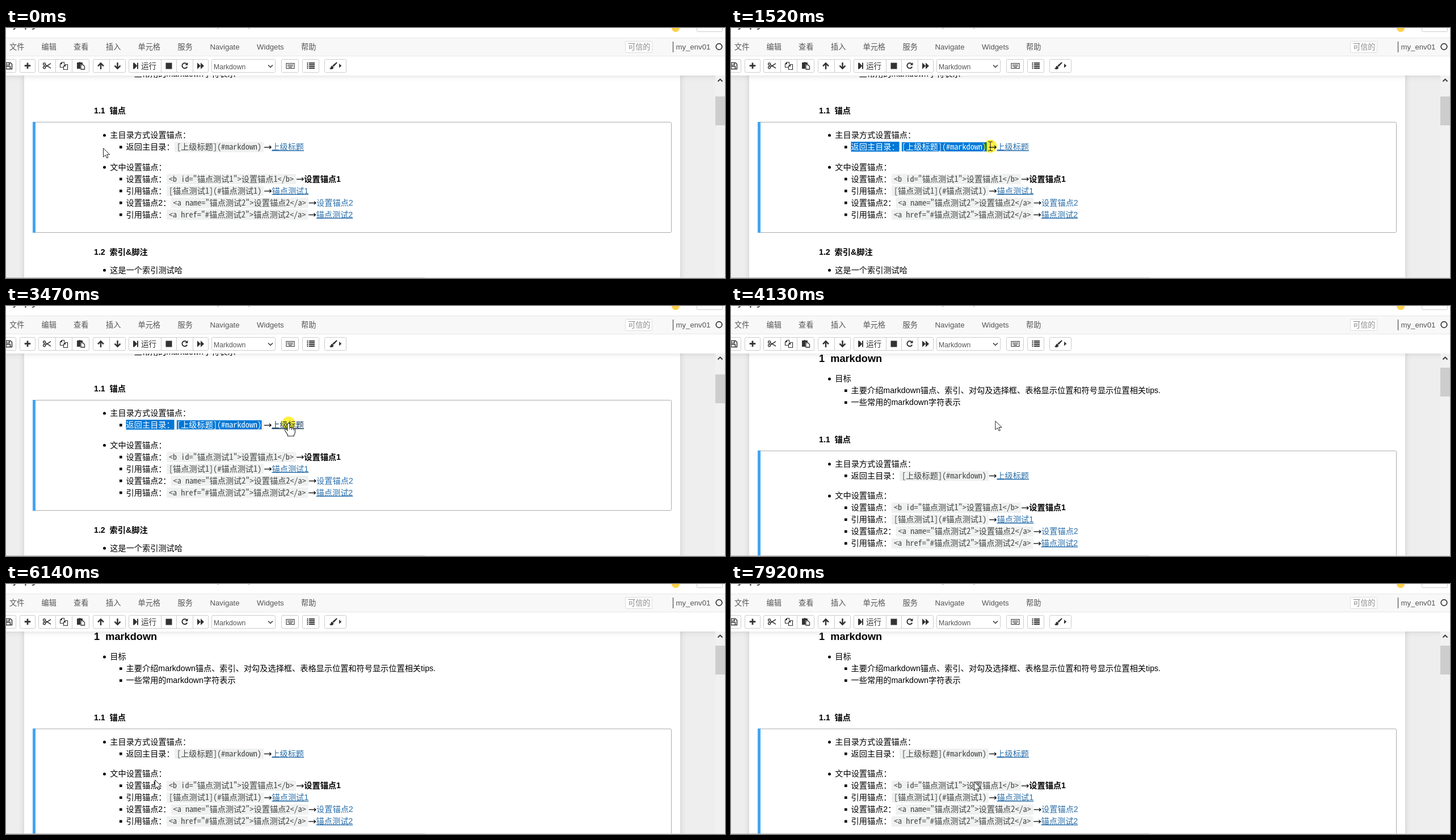
Animation of 1267 by 442 pixels, one loop 7.99 s. Source, as an HTML page:

```html
<!DOCTYPE html>
<html lang="zh-CN">
<head>
<meta charset="utf-8">
<title>Notebook anchors</title>
<style>
html, body { margin: 0; width: 100%; height: 100%; overflow: hidden; background: #eee; }
svg { display: block; width: 1267px; height: 442px; }
text { font: 14.2px "Liberation Sans", "Noto Sans CJK SC", "Noto Sans CJK", sans-serif; white-space: pre; }
.h1 { font-size: 18.2px; font-weight: bold; }
.b { font-weight: bold; }
.menu { font-size: 13.2px; fill: #555; }
.pale { fill: #888; }
.code { font-family: "Noto Sans Mono CJK SC", "Noto Sans CJK SC", "Liberation Mono", monospace; font-weight: 300; fill: #444; }
.code .half { font-family: "Noto Sans Mono CJK SC", "Liberation Mono", monospace; }
.link { fill: #296eaa; }
.u { text-decoration: underline; }
.hover { fill: #173a5c; }
.sel text { fill: #fff; }
.btn { fill: #fff; stroke: #ccc; }
.ink { fill: #333; }
.line { fill: none; stroke: #333; }
#ring { fill: #fff040; mix-blend-mode: multiply; }
</style>
</head>
<body>
<svg id="stage" viewBox="0 0 1267 442" xmlns="http://www.w3.org/2000/svg"></svg>
<script>
const LOOP = 7990, SCROLL_AT = 3600;
const PAGE_Y = -0.4, SCROLLED_Y = 89.2;
const EM = 14.2, HALF = EM / 2;
const stage = document.getElementById('stage');

// Latin letters in code take half the width of a Chinese one.
const pen = document.createElement('canvas').getContext('2d');
pen.font = '100px "Noto Sans Mono CJK SC", "Liberation Mono", monospace';
const halfSize = HALF * 100 / pen.measureText('m').width;

const esc = s => s.replace(/&/g, '&amp;').replace(/</g, '&lt;').replace(/>/g, '&gt;');
const text = (x, y, s, cls = '') => `<text x="${x}" y="${y}" class="${cls}">${esc(s)}</text>`;
const rect = (x, y, w, h, fill) => `<rect x="${x}" y="${y}" width="${w}" height="${h}" fill="${fill}"/>`;
const box = (x, y, w, h, r = 2) => `<rect class="btn" x="${x}" y="${y}" width="${w}" height="${h}" rx="${r}"/>`;
const ink = d => `<path class="ink" d="${d}"/>`;
const line = (d, w = 1.3) => `<path class="line" stroke-width="${w}" d="${d}"/>`;
const dot = (x, y, r, fill) => `<circle cx="${x}" cy="${y}" r="${r}" fill="${fill}"/>`;

const isWide = c => c.charCodeAt(0) > 255;
const columns = s => [...s].reduce((n, c) => n + (isWide(c) ? 2 : 1), 0);

function codeText(x, y, s) {
  const runs = s.match(/[\x00-\xff]+|[^\x00-\xff]+/g).map(r => isWide(r)
    ? r : `<tspan class="half" font-size="${halfSize}">${esc(r)}</tspan>`);
  return `<text x="${x}" y="${y}" class="code">${runs.join('')}</text>`;
}

function item(y, s) {
  return dot(173.5, y - 4.3, 2.5, '#000') + text(183.3, y, s);
}

function subItem(y, s) {
  return rect(200, y - 6.8, 4.6, 4.6, '#000') + text(211.6, y, s);
}

function arrow(x, y) {
  return `<path d="M${x + .8} ${y - 4.3}h12M${x + 10} ${y - 7.1}l3 2.8l-3 2.8" fill="none" stroke="#000" stroke-width="1.2"/>`;
}

// label, code sample, arrow, result
function sample(y, label, boxX, code, result, cls, id = '') {
  const w = columns(code) * HALF + 8, end = boxX + w;
  return subItem(y, label) +
    `<rect x="${boxX}" y="${y - 13.5}" width="${w}" height="18" rx="1" fill="#eff0f0"/>` +
    codeText(boxX + 4, y, code) + arrow(end, y) +
    `<g id="${id}">${text(end + EM, y, result, cls)}</g>`;
}

function page() {
  const label = '返回主目录：', code = '[上级标题](#markdown)';
  return text(155, 10, '1  markdown', 'h1') +
    item(44, '目标') +
    subItem(65, '主要介绍markdown锚点、索引、对勾及选择框、表格显示位置和符号显示位置相关tips.') +
    subItem(86, '一些常用的markdown字符表示') +
    text(155, 151.5, '1.1  锚点', 'b') +
    '<rect x="47.5" y="166.9" width="1125" height="195" rx="2" fill="#fff" stroke="#ababab"/>' +
    rect(47, 166.4, 5, 196, '#42a5f5') +
    item(194.5, '主目录方式设置锚点：') +
    sample(215.5, label, 297, code, '上级标题', 'link u', 'top') +
    item(251, '文中设置锚点：') +
    sample(272, '设置锚点：', 283, '<b id="锚点测试1">设置锚点1</b>', '设置锚点1', 'b') +
    sample(293, '引用锚点：', 283, '[锚点测试1](#锚点测试1)', '锚点测试1', 'link u') +
    sample(314, '设置锚点2：', 290.6, '<a name="锚点测试2">设置锚点2</a>', '设置锚点2', 'link') +
    sample(335, '引用锚点：', 283, '<a href="#锚点测试2">锚点测试2</a>', '锚点测试2', 'link u') +
    text(155, 401, '1.2  索引&脚注', 'b') +
    item(433, '这是一个索引测试哈') +
    `<g id="sel" class="sel" clip-path="url(#selClip)">${rect(211.5, 201.5, 85, 17.5, '#0078d7')}
      ${rect(301, 202.5, 149.5, 16, '#0078d7')}${text(211.6, 215.5, label)}${codeText(301, 215.5, code)}</g>`;
}

function header() {
  const menus = [[6, '文件'], [62.5, '编辑'], [119, '查看'], [176, '插入'], [232.5, '单元格'],
    [302.5, '服务'], [359.5, 'Navigate'], [442, 'Widgets'], [520, '帮助']];
  return rect(0, 0, 1267, 84, '#fff') + rect(0, 17, 1267, 33, '#e7e7e7') + rect(0, 18, 1267, 31, '#f8f8f8') +
    `<text x="13" y="-2" style="font-size:24px" fill="#4e4e4e">jupyter</text>` +
    text(370, -2, '(自动保存)', 'menu') +
    dot(1180, 0, 7, '#ffd04a') + box(1217.5, -15.5, 45, 22) +
    menus.map(([x, s]) => text(x, 38, s, 'menu')).join('') +
    `<rect x="1091.5" y="23.5" width="47" height="20" rx="1" fill="#fff" stroke="#ddd"/>` +
    text(1096, 38, '可信的', 'menu pale') +
    rect(1175, 24, 1, 19, '#333') + text(1180.5, 38, 'my_env01', 'menu') +
    '<circle class="line" cx="1256.5" cy="33" r="5.3" stroke-width="1.7"/>';
}

function toolbar() {
  const boxes = [[-20, 18], [24, 52], [57, 147], [153, 211], [216, 357], [362, 475], [485, 516], [522, 552], [561, 600]];
  const rows = [62, 65, 68, 71];
  return boxes.map(([a, b]) => box(a + .5, 55.5, b - a - 1, 23)).join('') +
    [87, 116, 182, 273, 300, 329].map(x => rect(x, 56, 1, 23, '#ccc')).join('') +
    line('M-3 61.5H8L10.5 64V72.5H-3ZM0 72V68H7.5V72M0 62V65.5H6V62', 1.5) +
    line('M38 61.5V72M32.7 66.7H43.3', 2.8) +
    line('M67.5 61.8a2 2 0 1 0 .1 0M67.5 67.8a2 2 0 1 0 .1 0M69.3 64.8L79 71.2M69.3 69L79 62.6', 1.5) +
    line('M102.5 64.5V60.5H98.5L95.5 63.5V69.5H101M98.5 60.5V63.5H95.5', 1.2) +
    line('M104.5 64.5H108.5V73.5H101.5V67.5ZM104.5 64.5V67.5H101.5', 1.2) +
    ink('M125 61h3q2-2 4 0h3v3h-4v8h-6z') + line('M132 65H135.5L138.5 68V73H132Z', 1.3) +
    line('M167 73V62.5M162 67.3L167 62.2L172 67.3', 2.5) +
    line('M196.5 61V71.5M191.5 66.7L196.5 71.8L201.5 66.7', 2.5) +
    ink('M224 61.5h2.2V66L231 61.5v11L226.2 68v4.5H224zM231 61.5h2v11h-2z'.replace('V66L231 61.5v11L226.2 68v4.5H224z', 'v11h-2.2zM226.2 61.5l5 5.5-5 5.5z')) +
    `<text class="ink" x="238" y="72" style="font-size:13.6px">运行</text>` +
    ink('M281.5 61.5h11v11h-11zM320.5 60.8v5h-5z') +
    line('M318.4 63.5A4.6 4.6 0 1 0 319.2 68.5', 2) +
    ink('M337 61.3l6 5.7-6 5.7zM343 61.3l6 5.7-6 5.7z') +
    `<text x="366" y="72.5" style="font-size:12.2px" fill="#555">Markdown</text>` +
    line('M462 65.5L466 69.5L470 65.5', 1.5) +
    line('M494 62.5H508V71.5H494ZM496 65H506M496 67.2H506', 1.1) + line('M498 69.5H504', 1.2) +
    rows.map(y => rect(530.5, y - 1, 2, 2, '#333') + rect(534, y - 1, 10, 2, '#333')).join('') +
    ink('M582.5 60.2q1.5.3 1 1.8l-6 6.4-2.2-2.2zM574.8 66.8l2.2 2.2q.5 4-3.5 4-3 0-3.3-2.6 1.8 1 2-1 .4-2.4 2.6-2.6zM587 63l4.3 3.8-4.3 3.8z');
}

const cursors = {
  arrow: '<path d="M.5.5V16L4.2 12.6L6.7 18L9 17L6.6 11.8H11.7Z" fill="#fff" stroke="#222" stroke-width="1"/>',
  beam: '<path d="M-4-8H-1.2L0-7L1.2-8H4M-4 8H-1.2L0 7L1.2 8H4M0-7V7" fill="none" stroke="#222" stroke-width="1.1"/>',
  hand: '<path d="M-2 1.5Q0-1.5 2 1.5V8q2-1 3.5.6 2-.8 3.3.8 2.6-.4 2.6 2V16q0 3-2 5v2H-1.5v-2L-6 14q-1.4-2.6.2-3.2 1.4-.4 3.8 2.4ZM2 8v3M5.5 9v3M8.8 10v3" fill="#fff" stroke="#222" stroke-width="1.1"/>'
};

stage.innerHTML = `
<defs>
  <clipPath id="view"><rect y="84" width="1250" height="358"/></clipPath>
  <clipPath id="selClip"><rect id="selEdge" x="205" y="195" width="0" height="30"/></clipPath>
  <filter id="soft" x="-5%" y="-20%" width="110%" height="140%"><feGaussianBlur stdDeviation="5"/></filter>
</defs>
${rect(0, 0, 1267, 442, '#eee')}
<g clip-path="url(#view)">
  <rect x="31" y="60" width="1158" height="420" fill="#575757" opacity=".2" filter="url(#soft)"/>
  ${rect(32, 84, 1156, 358, '#fff')}
  <g id="page">${page()}</g>
  <rect x="-20" y="0" width="1290" height="85" fill="#575757" opacity=".2" filter="url(#soft)"/>
</g>
${rect(1250, 84, 17, 358, '#f1f1f1')}
${line('M1254.5 94.5L1258.5 90.5L1262.5 94.5', 1.8)}
<rect id="thumb" x="1250" y="121" width="17" height="51" fill="#cdcdcd"/>
${rect(0, 441, 1267, 1, '#dcdcdc')}${rect(0, 441, 738, 1, '#bdbdbd')}
${header()}${toolbar()}
<circle id="ring" r="11.5"/>
<g id="cursor">${Object.entries(cursors).map(([k, d]) => `<g id="${k}">${d}</g>`).join('')}</g>`;

const $ = id => document.getElementById(id);
const topLink = $('top').firstChild;

// time, x, y of the pointer
const path = [
  [0, 171, 212], [40, 171, 212], [490, 214, 211], [720, 214, 211], [880, 239, 211], [1520, 457, 209],
  [2015, 457, 209], [2300, 488, 214], [2520, 511, 216], [2740, 498, 207], [3600, 498, 207], [3670, 498, 208],
  [4095, 498, 208], [4130, 466, 203], [4400, 300, 140], [4620, 226, 107],
  [5115, 226, 107], [5500, 331, 210], [5930, 264, 343], [6070, 268, 342], [6140, 262, 346], [6280, 268, 345],
  [6445, 268, 345], [7230, 215, 347], [7300, 212, 348], [7465, 212, 348], [7920, 428, 349], [LOOP, 428, 349]
];

function pointer(t) {
  const i = path.findIndex(k => k[0] > t);
  const [t0, x0, y0] = path[i - 1], [t1, x1, y1] = path[i];
  const p = (t - t0) / (t1 - t0);
  return [x0 + (x1 - x0) * p, y0 + (y1 - y0) * p];
}

const show = (el, on) => el.setAttribute('visibility', on ? 'visible' : 'hidden');

function draw(t) {
  const [x, y] = pointer(t), scrolled = t >= SCROLL_AT;
  const shape = t >= 3670 || x < 209 ? 'arrow' : x < 468 ? 'beam' : 'hand';
  for (const k in cursors) show($(k), k === shape);
  $('cursor').setAttribute('transform', `translate(${x} ${y})`);

  show($('ring'), (t >= 750 && t < 2050) || (t >= 3470 && t < 3670));
  $('ring').setAttribute('cx', x);
  $('ring').setAttribute('cy', y);

  const edge = t < 920 ? 0 : t >= 1520 ? 250 : 6.5 + Math.floor((x - 211.5) / EM) * EM;
  $('selEdge').setAttribute('width', edge);
  show($('sel'), !scrolled);

  topLink.classList.toggle('hover', shape === 'hand' && !scrolled);
  $('page').setAttribute('transform', `translate(0 ${scrolled ? SCROLLED_Y : PAGE_Y})`);
  $('thumb').setAttribute('y', scrolled ? 109 : 121);
}

const start = performance.now();
function tick() {
  draw((performance.now() - start) % LOOP);
  requestAnimationFrame(tick);
}
tick();
</script>
</body>
</html>
```
